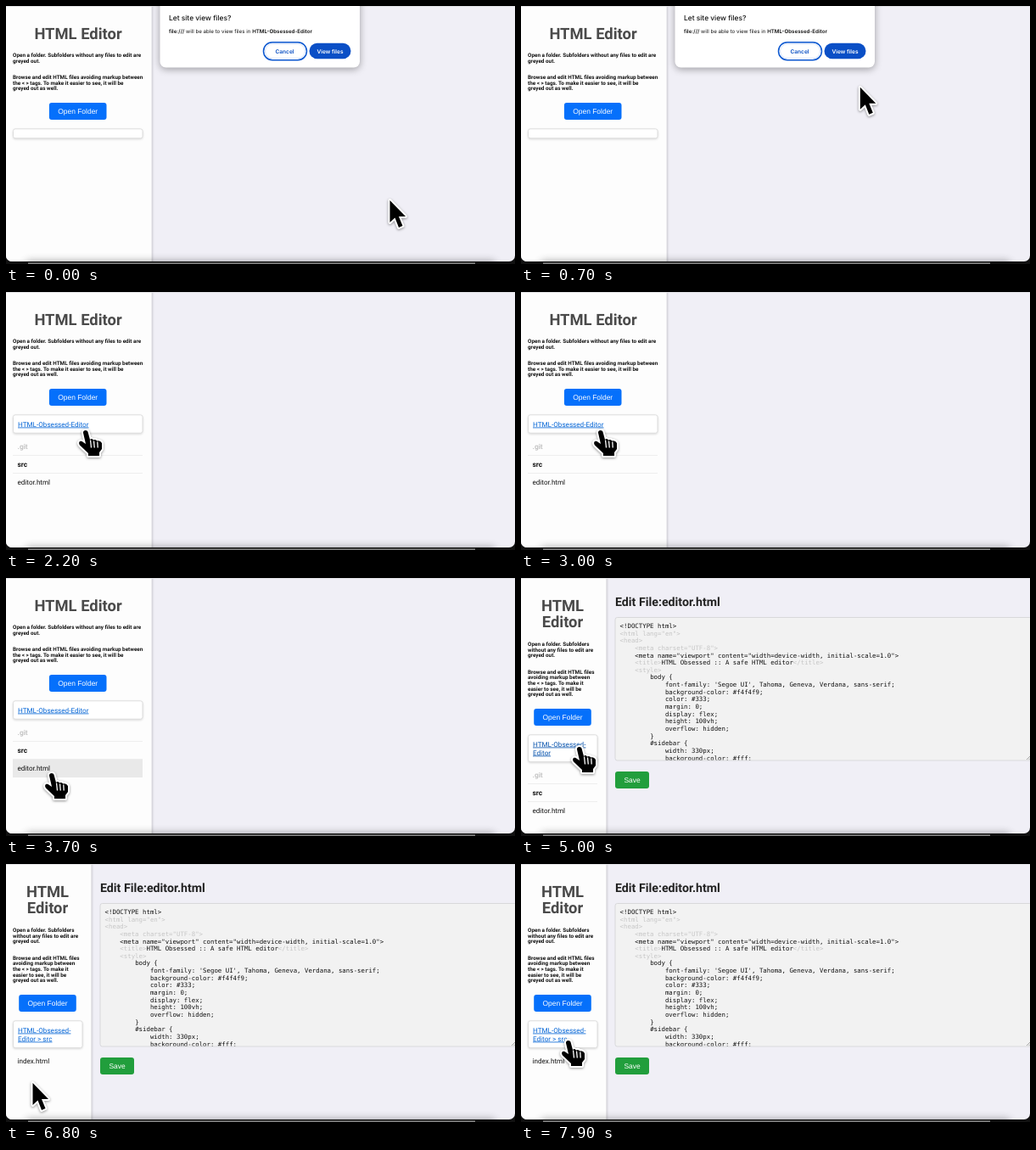
An HTML page that plays this animation: 600x304 px, repeating every 8000 ms.

```html
<!DOCTYPE html>
<html lang="en">
<head>
<meta charset="UTF-8">
<title>HTML Editor</title>
<style>
  html, body { margin: 0; width: 100%; height: 100%; overflow: hidden; background: #111; }
  svg { display: block; }
  text { font-family: Roboto, sans-serif; fill: #111; text-rendering: geometricPrecision; }
  .h1 { font-size: 18.4px; font-weight: 700; fill: #4a4a4a; text-anchor: middle; }
  .h2 { font-size: 14.2px; font-weight: 700; fill: #222; }
  .note { font-size: 6.35px; font-weight: 700; }
  .button { font: 8.45px 'Liberation Sans', sans-serif; fill: #fff; text-anchor: middle; }
  .link { font-size: 8.15px; fill: #0666d6; text-decoration: underline; }
  .link.hot { fill: #0a55ae; }
  .file { font-size: 8.1px; }
  .folder { font-size: 8.3px; font-weight: 700; }
  .off { font-size: 8.3px; font-weight: 700; fill: #c4c4c4; }
  .code { font: 7.38px 'DejaVu Sans Mono', monospace; }
  .dim { fill: #c6c6c6; }
  .ask { font: 500 8.4px Inter, sans-serif; }
  .detail { font: 6.2px Inter, sans-serif; }
  .detail tspan { font-weight: 600; }
  .choice { font: 600 6.6px Inter, sans-serif; text-anchor: middle; }
  .side { filter: drop-shadow(1px 0 1px rgba(0,0,0,.18)); }
  .card { fill: #fff; stroke: #ddd; filter: drop-shadow(0 1px 1px rgba(0,0,0,.14)); }
  .dialog { fill: #fff; filter: drop-shadow(0 2px 4px rgba(0,0,0,.35)); }
  .shade { fill: #000; opacity: .3; filter: blur(5px); }
  .cursor { fill: #000; stroke: #fff; stroke-width: 4; stroke-linejoin: round; paint-order: stroke;
            filter: drop-shadow(0 1px 1.5px rgba(0,0,0,.4)); }
</style>
</head>
<body>
<svg id="stage" width="600" height="304" viewBox="0 0 600 304"></svg>
<script>
const stage = document.getElementById('stage');
const LOOP = 8000, STEP = 100;
const LISTED = 1000, OPENED = 4000, ENTERED = 6300;

// time, x, y of the pointer
const PATH = [
  [0, 452.5, 229], [200, 428, 171], [400, 428, 171], [900, 384.5, 55], [1300, 384.5, 55],
  [2200, 91, 163], [3100, 91, 163], [3700, 51, 230], [4200, 51, 230], [4800, 66, 199],
  [5400, 66, 199], [6100, 31.5, 258], [7300, 31.5, 258], [7900, 53, 208]
];

const NOTES = {
  wide: [['Open a folder. Subfolders without any files to edit are', 'greyed out.'],
         ['Browse and edit HTML files avoiding markup between',
          'the < > tags. To make it easier to see, it will be', 'greyed out as well.']],
  narrow: [['Open a folder. Subfolders', 'without any files to edit are', 'greyed out.'],
           ['Browse and edit HTML files', 'avoiding markup between', 'the < > tags. To make it',
            'easier to see, it will be', 'greyed out as well.']]
};

const CODE = `<!DOCTYPE html>
<html lang="en">
<head>
    <meta charset="UTF-8">
    <meta name="viewport" content="width=device-width, initial-scale=1.0">
    <title>HTML Obsessed :: A safe HTML editor</title>
    <style>
        body {
            font-family: 'Segoe UI', Tahoma, Geneva, Verdana, sans-serif;
            background-color: #f4f4f9;
            color: #333;
            margin: 0;
            display: flex;
            height: 100vh;
            overflow: hidden;
        }
        #sidebar {
            width: 330px;
            background-color: #fff;`.split('\n');

const escape = s => s.replace(/&/g, '&amp;').replace(/</g, '&lt;').replace(/>/g, '&gt;');
const markup = (cls, x, y, inner) => `<text class="${cls}" x="${x}" y="${y}">${inner}</text>`;
const text = (cls, x, y, s) => markup(cls, x, y, escape(s));
const rect = (x, y, w, h, r, attrs) =>
  `<rect x="${x}" y="${y}" width="${w}" height="${h}" rx="${r}" ${attrs}/>`;

function pointerAt(t) {
  const i = PATH.findIndex(key => key[0] > t);
  if (i < 0) return PATH[PATH.length - 1].slice(1);
  const [t0, x0, y0] = PATH[i - 1], [t1, x1, y1] = PATH[i];
  const p = (t - t0) / (t1 - t0), k = p * p * (3 - 2 * p);
  return [x0 + (x1 - x0) * k, y0 + (y1 - y0) * k];
}

function stateAt(t) {
  const narrow = t >= OPENED, inside = t >= ENTERED;
  const rows = t < LISTED ? [] : inside ? [['file', 'index.html']]
    : [['off', '.git'], ['folder', 'src'], ['file', 'editor.html']];
  const crumbs = t < LISTED ? [] : !narrow ? ['HTML-Obsessed-Editor']
    : ['HTML-Obsessed-', inside ? 'Editor > src' : 'Editor'];
  const layout = narrow
    ? { side: 100.5, inner: 82, middle: 49, shift: 40, rowTop: 222 }
    : { side: 171.7, inner: 153, middle: 84.7, shift: 0, rowTop: 172 };
  return { narrow, inside, rows, crumbs, ...layout };
}

function hitTest(s, [x, y]) {
  const index = Math.floor((y - s.rowTop) / 21);
  const row = x > 8 && x < 8 + s.inner && s.rows[index] && s.rows[index][0] !== 'off' ? index : -1;
  const top = 148 + s.shift;
  const link = s.crumbs.length > 0 && x > 13 && x < 100 && y > top && y < s.rowTop - 7;
  const button = Math.abs(x - s.middle) < 34 && Math.abs(y - 124 - s.shift) < 10;
  return { row, link, hand: row >= 0 || link || button };
}

function sidebar(s, hit) {
  let out = rect(0, 0, s.side, 304, 0, 'class="side" fill="#fdfdfd"');
  out += s.narrow ? text('h1', 49, 38.5, 'HTML') + text('h1', 49, 58, 'Editor')
                  : text('h1', 85, 38.5, 'HTML Editor');
  let y = s.narrow ? 80 : 60;
  for (const paragraph of NOTES[s.narrow ? 'narrow' : 'wide']) {
    for (const line of paragraph) {
      out += text('note', 8, y, line);
      y += 6.6;
    }
    y += 12.9;
  }
  out += rect(s.middle - 33.8, 114 + s.shift, 67.6, 20, 3, 'fill="#0570fb"');
  out += text('button', s.middle, 126.8 + s.shift, 'Open Folder');
  out += rect(8.5, 144.8 + s.shift, s.inner - 0.5, 11 + 10.4 * s.crumbs.length, 2.5, 'class="card"');
  s.crumbs.forEach((crumb, i) => {
    out += text(s.narrow && !s.inside && hit.link ? 'link hot' : 'link',
      14, 158.5 + s.shift + 10 * i, crumb);
  });
  s.rows.forEach(([kind, label], i) => {
    const top = s.rowTop + 21 * i;
    if (i === hit.row) out += rect(8, top, s.inner, 21, 0, 'fill="#e9e9e9"');
    if (i < s.rows.length - 1) out += rect(8, top + 20.3, s.inner, 0.7, 0, 'fill="#e8e8e8"');
    out += text(kind, 13.5, top + 13.4, label);
  });
  return out;
}

function editor() {
  const lines = CODE.map((line, i) => {
    const indent = line.search(/\S/);
    const inner = escape(line.trim()).replace(
      /&lt;\/?(html|head|meta charset|title|style).*?&gt;/g, '<tspan class="dim">$&</tspan>');
    return markup('code', 5.6 + indent * 4.443, 13 + i * 8.64, inner);
  }).join('');
  return text('h2', 111, 33, 'Edit File:editor.html') +
    rect(111, 46.5, 491, 168.5, 2.5, 'fill="#f2f2f2" stroke="#d2d2d5" stroke-width=".8"') +
    `<svg x="111" y="46" width="489" height="168.5">${lines}</svg>` +
    '<path d="M596 214l4-4M598.5 214l1.5-1.5" stroke="#888" stroke-width=".7"/>' +
    rect(111, 228, 40, 20, 3, 'fill="#219e3c"') +
    text('button', 131, 241, 'Save');
}

function dialog() {
  return rect(181.5, -10, 235.5, 82.5, 7, 'class="dialog"') +
    text('ask', 192, 17.3, 'Let site view files?') +
    markup('detail', 192, 32.2,
      '<tspan>file:///</tspan> will be able to view files in <tspan>HTML-Obsessed-Editor</tspan>') +
    rect(303.5, 42.7, 51, 21, 10.5, 'fill="#fff" stroke="#0b57d0" stroke-width="1.5"') +
    rect(305.5, 44.7, 47, 17, 8.5, 'fill="#fff" stroke="#b9cff3" stroke-width=".6"') +
    markup('choice" style="fill:#0b50c4', 328.5, 55.5, 'Cancel') +
    rect(357.5, 43.8, 49, 18.5, 9.25, 'fill="#0a4fc6"') +
    markup('choice" style="fill:#fff', 382, 55.5, 'View files');
}

function cursor([x, y], hand) {
  const arrow = '<path d="M0 0V26L6 20.5L10.5 32L15 30L10.5 19H18.5Z"/>';
  const pointing = `<path d="M0 3C-.5 -.5 5 -1 5.7 2.5L8 11Q10 9 12 11.5Q14.5 10 16.5 12.5
    Q20 11.5 22 15V22L19 26V30H6V27L-4 17.5C-6.5 13.5 -3 11 0 14L3 16Z"/>
    <path d="M8.5 11.5l1 9M12.5 12.5l.8 8M16.8 13.5l.4 7" stroke-width="1.3"/>`;
  return `<g class="cursor" transform="translate(${x} ${y})">${hand ? pointing : arrow}</g>`;
}

function scene(t) {
  const s = stateAt(t), at = pointerAt(t), hit = hitTest(s, at);
  return '<clipPath id="window"><rect y="-20" width="600" height="321" rx="7"/></clipPath>' +
    '<rect width="600" height="304" fill="#111"/>' +
    rect(26, 302.5, 527, 1.5, 0, 'fill="#888"') +
    '<g clip-path="url(#window)">' +
    rect(0, 0, 600, 304, 0, 'fill="#f0eff6"') +
    sidebar(s, hit) +
    (s.narrow ? editor() : '') +
    rect(0, 0, 600, 0.8, 0, 'fill="#dcdce0"') +
    rect(24, 300, 552, 10, 0, 'class="shade"') +
    (t < LISTED ? dialog() : '') +
    '</g>' + cursor(at, hit.hand);
}

let shown = -1;
function frame() {
  const t = Math.floor(performance.now() % LOOP / STEP) * STEP;
  if (t !== shown) stage.innerHTML = scene(shown = t);
  requestAnimationFrame(frame);
}
frame();
</script>
</body>
</html>
```
